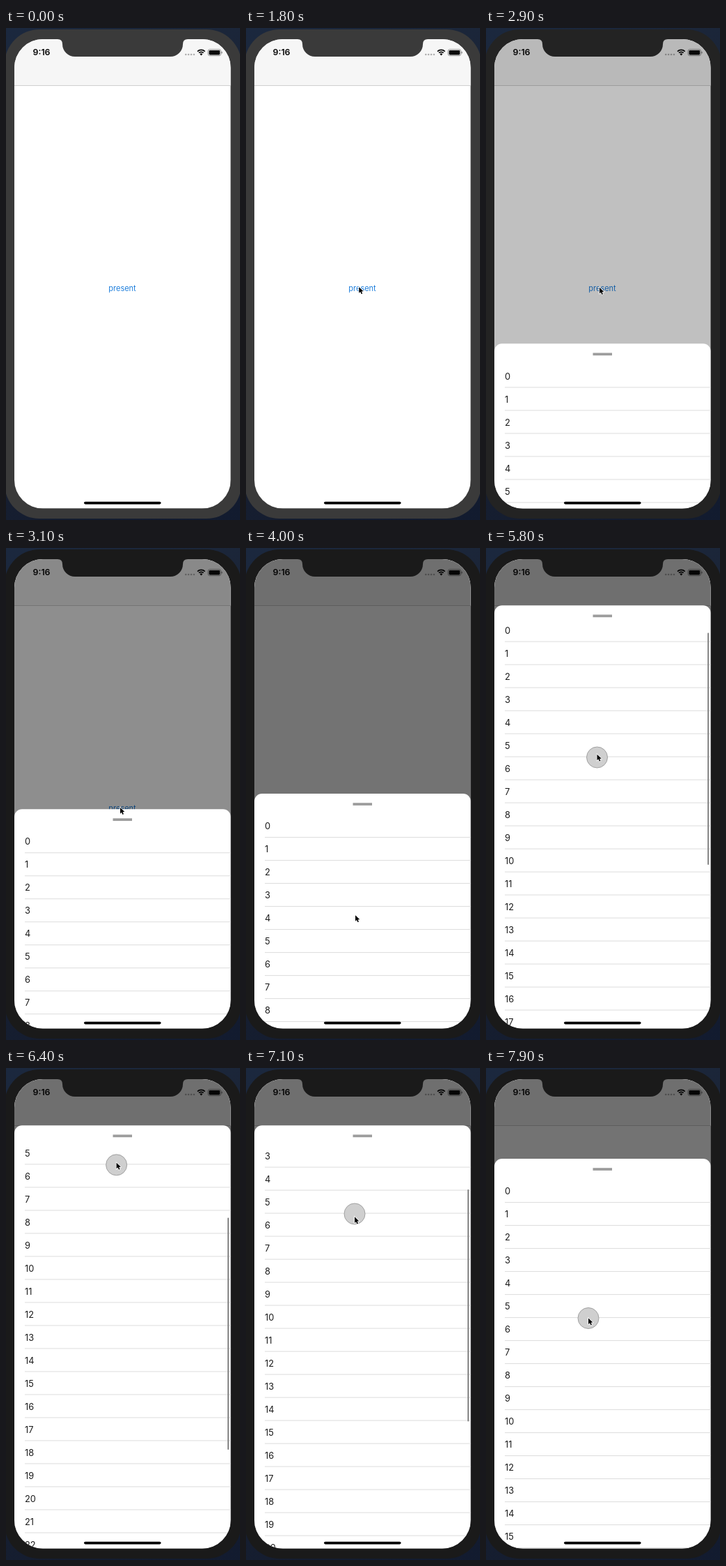
An HTML page with a canvas for the animation above (8000 ms loop, 336 by 705 pixels).

```html
<!DOCTYPE html>
<html lang="en">
<head>
<meta charset="utf-8">
<title>Bottom sheet</title>
<style>
html, body { margin: 0; width: 100%; height: 100%; overflow: hidden; background: #17202f; }
canvas { display: block; width: 336px; height: 705px; }
</style>
</head>
<body>
<canvas id="stage"></canvas>
<script>
const W = 336, H = 705, LOOP = 8000, STEP = 100;
const SCREEN = { x: 12, y: 16, w: 310.7, h: 672.6, r: 41 };
const BOTTOM = 689, REST = 352, SHEET_MIN = 82.3;
const ENTER = 300, PRESENT = 2650, DRAG = 4450;
const GRIP = 228.5, LEAD = 18, ROW = 33, LIST_TOP = 29.5;
const FONT = 'Inter, "Liberation Sans", sans-serif';

const canvas = document.getElementById('stage');
const dpr = window.devicePixelRatio || 1;
canvas.width = W * dpr;
canvas.height = H * dpr;
const c = canvas.getContext('2d');

// Smooth monotone curve through [time, value] points.
function curve(points) {
  const slope = i => (points[i + 1][1] - points[i][1]) / (points[i + 1][0] - points[i][0]);
  const last = points.length - 1;
  const tangent = points.map((_, i) => {
    if (i === 0) return slope(0);
    if (i === last) return slope(last - 1);
    const a = slope(i - 1), b = slope(i);
    return a * b > 0 ? 2 * a * b / (a + b) : 0;
  });
  return t => {
    if (t <= points[0][0]) return points[0][1];
    const i = points.findIndex(p => t <= p[0]) - 1;
    if (i < 0) return points[last][1];
    const [t0, v0] = points[i], [t1, v1] = points[i + 1];
    const d = t1 - t0, p = (t - t0) / d, q = 1 - p;
    return v0 * q * q * (1 + 2 * p) + v1 * p * p * (3 - 2 * p)
      + d * p * q * (tangent[i] * q - tangent[i + 1] * p);
  };
}

const dragY = curve([[DRAG, REST], [5000, 237], [5300, 195], [5800, 71.5], [6600, -109],
  [6700, -109], [7100, -19.5], [7600, 104], [7900, 130]]);
const hoverX = curve([[ENTER, 189], [900, 158.5], [1700, 158.5], [2000, 173], [2300, 173],
  [2500, 160], [3100, 164], [4000, 157], [5800, 159.5], [7100, 156], [7900, 147]]);
const hoverY = curve([[ENTER, 660], [900, 371], [3100, 372], [3500, 456], [4400, 577]]);

const ramp = (t, start, length) => Math.min(1, Math.max(0, (t - start) / length));

// Critically damped rise, then the finger takes over.
function sheetY(t) {
  if (t >= DRAG) return dragY(t);
  const x = Math.max(0, t - PRESENT) * 0.0098;
  return REST + (BOTTOM - REST) * (1 + x) * Math.exp(-x);
}

function rect(x, y, w, h, color) {
  c.fillStyle = color;
  c.fillRect(x, y, w, h);
}

function round(x, y, w, h, r, color) {
  c.beginPath();
  c.roundRect(x, y, w, h, r);
  if (color) {
    c.fillStyle = color;
    c.fill();
  }
}

function circle(x, y, r, color) {
  c.beginPath();
  c.arc(x, y, r, 0, Math.PI * 2);
  c.fillStyle = color;
  c.fill();
}

function text(str, x, y, size, color, weight = 400, align = 'left') {
  c.font = `${weight} ${size}px ${FONT}`;
  c.textAlign = align;
  c.fillStyle = color;
  c.fillText(str, x, y);
}

function wallpaper() {
  const g = c.createLinearGradient(0, 0, W, H);
  g.addColorStop(0, '#1b283e');
  g.addColorStop(0.5, '#1b2231');
  g.addColorStop(1, '#121b2f');
  rect(0, 0, W, H, g);
}

function statusBar() {
  text('9:16', 38.5, 39.4, 12.4, '#0a0a0a', 600);
  for (let i = 0; i < 4; i++) circle(258.2 + i * 3.9, 38, 1.3, '#b0b0b0');
  c.strokeStyle = '#0a0a0a';
  c.lineWidth = 1.7;
  for (const r of [4.7, 7.6]) {
    c.beginPath();
    c.arc(280.3, 39, r, -Math.PI * 0.75, -Math.PI * 0.25);
    c.stroke();
  }
  c.beginPath();
  c.moveTo(280.3, 39.6);
  c.arc(280.3, 39, 2.5, -Math.PI * 0.78, -Math.PI * 0.22);
  c.fillStyle = '#0a0a0a';
  c.fill();
  round(290, 30.7, 18.6, 9, 2.6);
  c.strokeStyle = '#8c8c8c';
  c.lineWidth = 0.9;
  c.stroke();
  round(291.4, 32, 15.8, 6.4, 1.4, '#0a0a0a');
  round(309.4, 33.7, 1.2, 3, 0.6, '#8c8c8c');
}

function notch(color) {
  c.beginPath();
  c.moveTo(74, 15);
  c.lineTo(74, 16);
  c.quadraticCurveTo(81, 16, 81, 23);
  c.arcTo(81, 41, 100, 41, 18);
  c.arcTo(254, 41, 254, 22, 18);
  c.lineTo(254, 23);
  c.quadraticCurveTo(254, 16, 261, 16);
  c.lineTo(261, 15);
  c.fillStyle = color;
  c.fill();
}

// Dragging past the top edge scrolls the list instead.
function sheet(v, barAlpha) {
  const top = Math.max(SHEET_MIN, v);
  const scroll = Math.max(0, SHEET_MIN - v);
  round(SCREEN.x, top, SCREEN.w, H, 11, '#fff');
  rect(153.5, top + 13.2, 27.5, 3.7, '#9c9c9c');
  c.save();
  c.beginPath();
  c.rect(SCREEN.x, top + LIST_TOP, SCREEN.w, H);
  c.clip();
  for (let i = 0; ; i++) {
    const y = top + LIST_TOP - scroll + i * ROW;
    if (y > H) break;
    text(String(i), 27, y + 21.8, 12.8, '#1c1c1c');
    rect(27, y + ROW - 0.4, 296, 1, '#dcdcdc');
  }
  c.restore();
  c.globalAlpha = barAlpha;
  round(318, top + 33 + scroll * 0.577, 2.2, 332.5, 1.1, '#8b8b8b');
  c.globalAlpha = 1;
}

function touch(x, y) {
  circle(x, y, 15, '#cfcfcf');
  c.strokeStyle = '#9a9a9a';
  c.lineWidth = 0.9;
  c.stroke();
}

function pointer(x, y) {
  c.save();
  c.translate(x, y);
  c.scale(0.9, 0.9);
  c.beginPath();
  c.moveTo(0, 0);
  for (const [px, py] of [[0, 9.6], [2.2, 7.6], [3.8, 11.2], [5.5, 10.4], [4, 7], [7, 6.8]]) c.lineTo(px, py);
  c.closePath();
  c.strokeStyle = '#fff';
  c.lineWidth = 1.6;
  c.stroke();
  c.fillStyle = '#000';
  c.fill();
  c.restore();
}

function draw(t) {
  const shade = Math.round(58 - 32 * ramp(t, PRESENT, 350));
  const bezel = `rgb(${shade},${shade},${shade})`;
  const dim = 0.55 * ramp(t, PRESENT, 560);
  const barAlpha = ramp(t, 5600, 200) * (1 - ramp(t, 7500, 300));
  const { x, y, w, h, r } = SCREEN;

  c.setTransform(dpr, 0, 0, dpr, 0, 0);
  wallpaper();
  round(-2, 2, 340, 701, 50, bezel);

  c.save();
  round(x, y, w, h, r);
  c.clip();
  rect(x, y, w, h, '#fff');
  rect(x, y, w, 66, '#f6f6f6');
  rect(x, 82, w, 1, '#cfcfcf');
  statusBar();
  text('present', 167, 377, 11, '#1f7fdc', 400, 'center');
  rect(x, y, w, h, `rgba(0,0,0,${dim})`);
  if (t > PRESENT) sheet(sheetY(t), barAlpha);
  round(112, 678.7, 110.5, 3.7, 1.8, '#000');
  c.restore();
  notch(bezel);

  if (t < ENTER) return;
  const dragging = t >= DRAG;
  if (dragging) touch(hoverX(t), dragY(t) + GRIP);
  pointer(hoverX(t), dragging ? dragY(t + LEAD) + GRIP : hoverY(t));
}

function tick() {
  const t = performance.now() % LOOP;
  draw(Math.floor(t / STEP) * STEP);
  requestAnimationFrame(tick);
}
tick();
</script>
</body>
</html>
```
